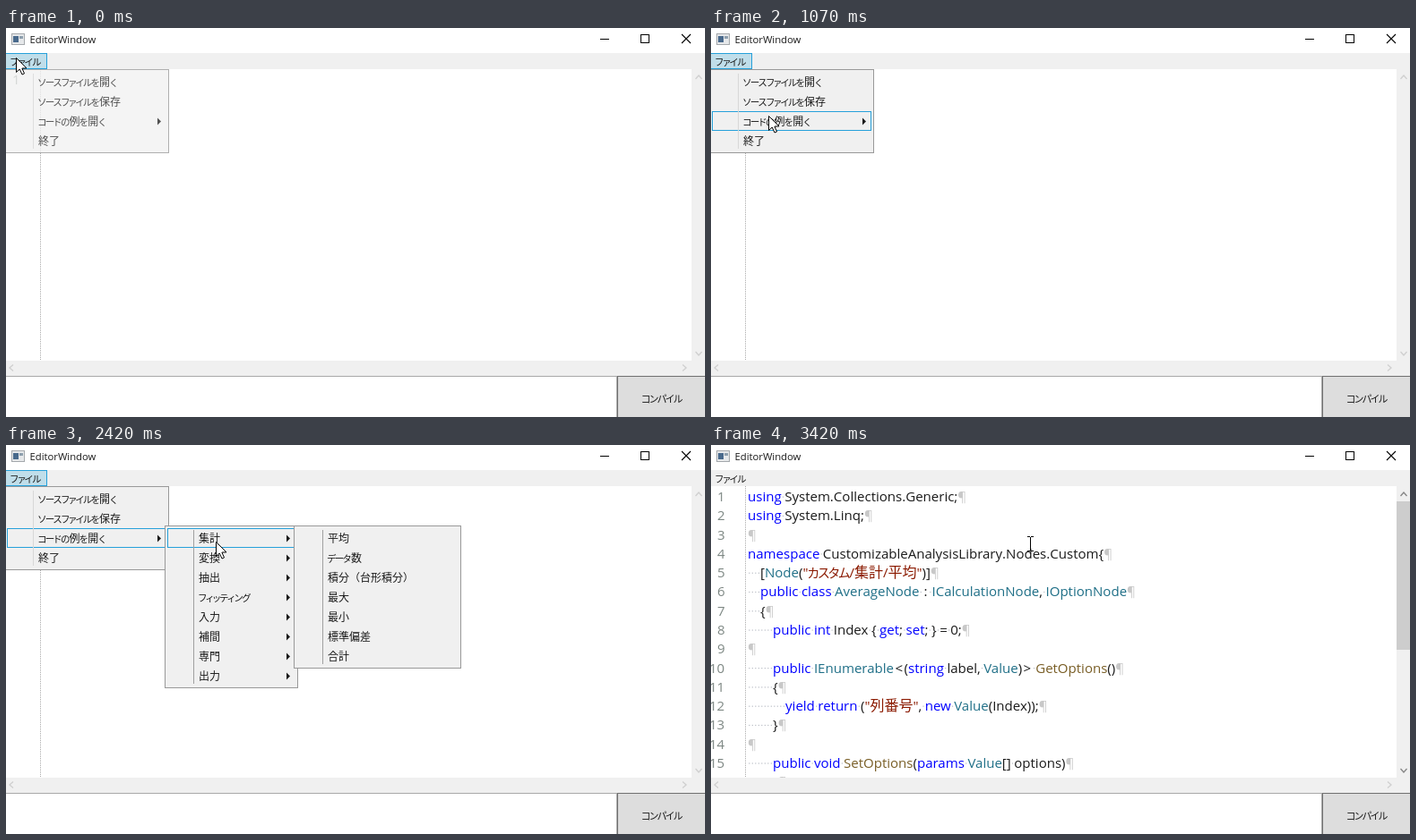
An HTML page with a canvas for the animation above (4.61 s loop, 780 by 435 pixels).

```html
<!DOCTYPE html>
<html lang="ja">
<head>
<meta charset="utf-8">
<title>EditorWindow</title>
<style>
  html, body { margin: 0; width: 100%; height: 100%; overflow: hidden; background: #fff; }
  canvas { display: block; }
</style>
</head>
<body>
<canvas id="stage" width="780" height="435"></canvas>
<script>
const ctx = document.getElementById('stage').getContext('2d');
const LOOP = 4610, TICK = 71;
const ACCENT = '#26a0da', HOVER = '#c0deea', PANEL = '#f0f0f0', INK = '#1a1a1a';

// Pointer stops: tick, x, y
const STOPS = [[0, 11, 33], [2, 11, 33], [6, 35, 50], [13, 64, 98], [15, 64, 98],
  [26, 206, 108], [31, 206, 108], [34, 234, 108], [38, 354, 108], [65, 354, 108]];

const MENUS = [
  { x: -2, y: 46, w: 183, rule: '#d7d7d7', parents: [2],
    items: ['ソースファイルを開く', 'ソースファイルを保存', 'コードの例を開く', '終了'] },
  { x: 177, y: 90, w: 148, rule: '#a0a0a0', parents: [0, 1, 2, 3, 4, 5, 6, 7],
    items: ['集計', '変換', '抽出', 'フィッティング', '入力', '補間', '専門', '出力'] },
  { x: 321, y: 90, w: 186, rule: '#a0a0a0', parents: [],
    items: ['平均', 'データ数', '積分（台形積分）', '最大', '最小', '標準偏差', '合計'] },
];

const CODE = `using System.Collections.Generic;
using System.Linq;

namespace CustomizableAnalysisLibrary.Nodes.Custom{
    [Node("カスタム/集計/平均")]
    public class AverageNode : ICalculationNode, IOptionNode
    {
        public int Index { get; set; } = 0;

        public IEnumerable<(string label, Value)> GetOptions()
        {
            yield return ("列番号", new Value(Index));
        }

        public void SetOptions(params Value[] options)
        {`.split('\n');

const SYNTAX = [
  [/^"/, '#8b1a00'],
  [/^(using|namespace|public|class|int|get|set|string|yield|return|new|void|params)$/, '#0000ff'],
  [/^(Node|AverageNode|ICalculationNode|IOptionNode|IEnumerable|Value)$/, '#1f6f87'],
  [/^[GS]etOptions$/, '#795e26'],
];

const clamp = v => Math.max(0, Math.min(1, v));

function rect(x, y, w, h, fill, stroke) {
  if (fill) { ctx.fillStyle = fill; ctx.fillRect(x, y, w, h); }
  if (stroke) { ctx.strokeStyle = stroke; ctx.lineWidth = 1; ctx.strokeRect(x + .5, y + .5, w - 1, h - 1); }
}

function path(points, { fill, stroke, width = 1, close = false }) {
  ctx.beginPath();
  points.forEach(([x, y]) => ctx.lineTo(x, y));
  if (close) ctx.closePath();
  if (fill) { ctx.fillStyle = fill; ctx.fill(); }
  if (stroke) { ctx.strokeStyle = stroke; ctx.lineWidth = width; ctx.stroke(); }
}

// Draws mixed Latin, kanji and tightly set kana; returns the end position.
function text(str, x, y, size = 12, color = INK) {
  ctx.fillStyle = color;
  for (const run of str.match(/[ァィッ]|[ぁ-ヿ]|[^\x00-\xffぁ-ヿ]+|[\x00-\xff]+/g)) {
    const kana = /[ぁ-ヿ]/.test(run), latin = run.charCodeAt(0) < 256;
    ctx.font = latin ? `${size * .94}px "Open Sans", sans-serif`
      : `${size * (kana ? .88 : 1)}px "Noto Sans CJK JP", "Noto Sans CJK", sans-serif`;
    const squeeze = kana ? size * (/[ァィッ]/.test(run) ? .24 : .16) : 0;
    ctx.fillText(run, x - squeeze / 2, y);
    x += ctx.measureText(run).width - squeeze;
  }
  return x;
}

function pointer(tick) {
  const i = Math.max(1, STOPS.findIndex(s => s[0] >= tick));
  const [t0, x0, y0] = STOPS[i - 1], [t1, x1, y1] = STOPS[i];
  let p = clamp((tick - t0) / (t1 - t0));
  if (t1 === 26) p = p * p * (3 - 2 * p);
  return [x0 + (x1 - x0) * p, y0 + (y1 - y0) * p];
}

function drawCodeLine(line, n) {
  const y = 63 + 21.28 * n;
  let x = 41;
  text(String(n + 1), n < 9 ? 7 : -2, y, 16, '#7d8783');
  for (const word of line.match(/"[^"]*"|\w+|\s|[^\w\s]/g) || []) {
    if (word === ' ') {
      rect(x + 1.2, y - 5.5, 1.2, 1.2, '#b8bcc4');
      x += 3.5;
    } else {
      const rule = SYNTAX.find(([test]) => test.test(word));
      const pad = /[:<>]/.test(word) ? 1.5 : 0;
      x = text(word, x + pad, y, 16, rule ? rule[1] : INK) + pad;
    }
  }
  text('¶', x, y, 16, '#c8c8c8');
}

function chevron(x, y, dx, dy, color) {
  path([[x - 3.5 * dy - 2 * dx, y - 3.5 * dx - 2 * dy], [x + 2 * dx, y + 2 * dy],
    [x + 3.5 * dy - 2 * dx, y + 3.5 * dx - 2 * dy]], { stroke: color, width: 1.3 });
}

function drawWindow(loaded, menuOpen) {
  rect(0, 0, 780, 435, '#fff');
  ctx.setLineDash([1, 1]);
  path([[38.5, 46], [38.5, 372]], { stroke: '#aaa' });
  ctx.setLineDash([]);
  (loaded ? CODE : []).forEach(drawCodeLine);
  if (!loaded) text('1', 7, 63, 16, '#7d8783');

  rect(0, 28, 780, 18, PANEL);
  rect(765, 46, 15, 326, PANEL);
  rect(0, 372, 780, 17, PANEL);
  if (loaded) rect(765, 63, 15, 166, '#cdcdcd');
  const arrow = loaded ? '#858585' : '#cfcfcf';
  chevron(773, 55, 0, -1, arrow);
  chevron(773, 364, 0, 1, arrow);
  chevron(6, 380, -1, 0, '#cfcfcf');
  chevron(757, 380, 1, 0, '#cfcfcf');

  rect(-1, 389, 683, 47, '#fff', '#a8a8a8');
  rect(682, 389, 99, 47, '#ddd', '#707070');
  text('コンパイル', 709.5, 418.5, 12.5);

  rect(6, 6, 15, 13, '#e6e8ea', '#a4a8ac');
  rect(8, 9, 6, 7, '#48698c');
  rect(15, 9, 4, 3, '#8fa0ae');
  text('EditorWindow', 26.5, 17);
  rect(663, 12, 10, 1, '#000');
  rect(708, 7, 10, 10, null, '#000');
  path([[754, 7], [764, 17]], { stroke: '#000', width: 1.1 });
  path([[764, 7], [754, 17]], { stroke: '#000', width: 1.1 });

  if (menuOpen) rect(-1, 28, 47, 18, HOVER, ACCENT);
  text('ファイル', 5, 41.5);
}

function drawMenu({ x, y, w, items, parents, rule }, hovered, alpha) {
  const h = items.length * 22 + 6;
  ctx.globalAlpha = alpha;
  rect(x, y, w + 1, h, PANEL, '#999');
  if (hovered >= 0) {
    const fill = parents.includes(hovered) ? null : HOVER;
    rect(x + 3, y + 3 + hovered * 22, w - 5, 22, fill, ACCENT);
  }
  rect(x + 32, y + 5, 1, h - 10, rule);
  items.forEach((label, i) => {
    const mid = y + 14 + i * 22;
    text(label, x + 38, mid + 4.5);
    if (parents.includes(i)) {
      const ax = x + w - 12;
      path([[ax, mid - 3.5], [ax + 4, mid + .5], [ax, mid + 4.5]], { fill: INK, close: true });
    }
  });
  ctx.globalAlpha = 1;
}

function drawArrow(x, y) {
  const shape = [[0, 0], [0, 16], [3.7, 12.5], [6.5, 18.5], [9, 17.4], [6.4, 11.6], [11.5, 11.4]];
  path(shape.map(([a, b]) => [x + a + .5, y + b + .5]), { fill: '#fff', stroke: '#000', close: true });
}

function drawBeam(x, y) {
  rect(x, y - 7, 1, 15, '#000');
  for (const edge of [y - 8, y + 8]) {
    rect(x - 3, edge, 3, 1, '#000');
    rect(x + 1, edge, 3, 1, '#000');
  }
}

function draw(time) {
  const tick = Math.floor((time % LOOP + 5) / TICK);
  const [x, y] = pointer(tick);
  const [hx, hy] = pointer(tick - 1); // hover lags one tick behind the pointer
  const menuOpen = tick < 46, loaded = tick >= 48;

  drawWindow(loaded, menuOpen);
  if (menuOpen) {
    const level = hx >= 324 ? 2 : hx >= 178 ? 1 : 0;
    const row = level ? 2 : hy < 49 ? -1 : Math.floor((hy - 49) / 22);
    const alphas = [.75 + tick / 4, (tick - 17) / 3, (tick - 30) / 3].map(clamp);
    const hovered = [row, level > 0 ? 0 : -1, level > 1 ? 0 : -1];
    MENUS.forEach((menu, i) => alphas[i] && drawMenu(menu, hovered[i], alphas[i]));
  }
  if (tick === 45 || tick === 46) {
    ctx.fillStyle = 'rgba(240, 225, 50, .75)';
    ctx.beginPath();
    ctx.arc(354, 109, 12, 0, 7);
    ctx.fill();
    if (menuOpen) text('平均', 359, 108.5);
  }
  loaded ? drawBeam(356, 110) : drawArrow(x, y);
}

function frame() {
  draw(performance.now());
  requestAnimationFrame(frame);
}
frame();
</script>
</body>
</html>
```
